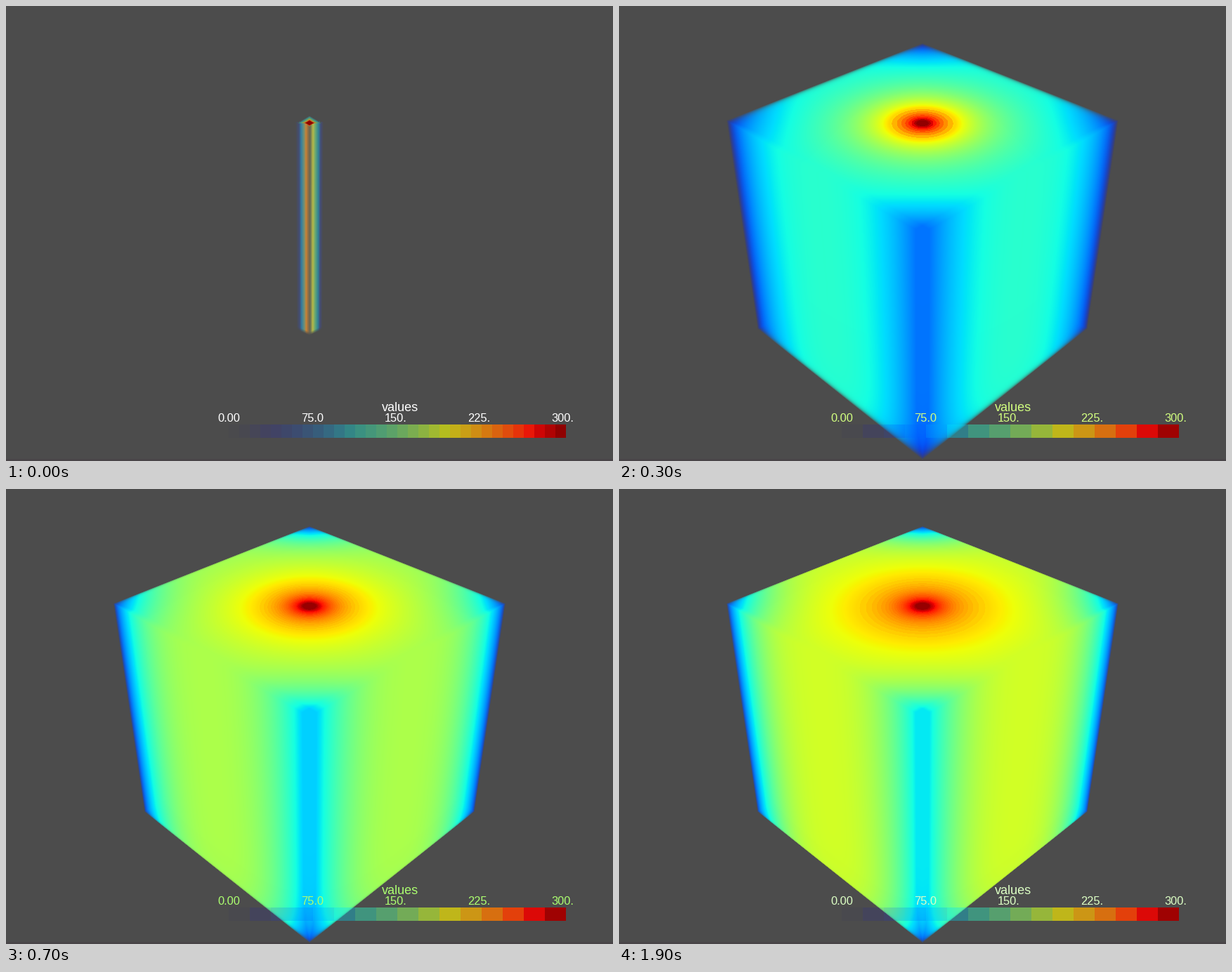
These frames come from a looping animation (864x648 px, 2 s). A matplotlib script:

```python
import numpy as np
import matplotlib.pyplot as plt
from matplotlib.animation import FuncAnimation

W, H, DPI = 864, 648, 100
FRAMES, INTERVAL = 20, 100
BG = np.array([76, 76, 76]) / 255
JET = plt.get_cmap("jet", 1024)

# Isometric camera looking at a unit cube with a 30 degree view angle
FOCAL = H / 2 / np.tan(np.radians(15))
DIST = np.sqrt(0.75) / np.sin(np.radians(15))
HALF = 0.499
VIEW = np.array([1, 1, 1]) / np.sqrt(3)
RIGHT = np.array([-1, 1, 0]) / np.sqrt(2)
UP = np.array([-1, -1, 2]) / np.sqrt(6)


def cast_rays():
    """Return the mask of pixels on the cube, entry points and path lengths."""
    rows, cols = np.mgrid[0:H, 0:W]
    sx = (cols + 0.5 - W / 2) / FOCAL
    sy = (H / 2 - rows - 0.5) / FOCAL
    rays = sx[..., None] * RIGHT + sy[..., None] * UP - VIEW
    rays = np.where(np.abs(rays) < 1e-9, 1e-9, rays)
    eye = DIST * VIEW
    t1, t2 = (-HALF - eye) / rays, (HALF - eye) / rays
    near = np.minimum(t1, t2).max(axis=-1)
    far = np.maximum(t1, t2).min(axis=-1)
    hit = far > near
    entry = eye + near[hit][:, None] * rays[hit]
    length = (far - near)[hit] * np.linalg.norm(rays[hit], axis=-1)
    return hit, entry, length


HIT, ENTRY, LENGTH = cast_rays()
# Long rays show the volume a little below its surface, short ones the surface
DEPTH = 1 - np.exp(-LENGTH / 0.1)
PX, PY = (np.clip(ENTRY[:, i] - 0.015 * DEPTH, -0.5, 0.5 - 0.045 * DEPTH)
          for i in (0, 1))
RADIUS = np.maximum(np.hypot(PX, PY), 0.012)
CORNER = (16 * PX**2 * PY**2) ** 1.5

HOT = 0.514 - 0.115 * np.log(RADIUS) + 0.04 * np.exp(-(RADIUS / 0.08) ** 2)
STEADY = HOT - 0.37 * CORNER
LAG = (1 - np.exp(-(RADIUS / 0.19) ** 1.5)) * (1 - 0.8 * CORNER)


def draw_cube(img, n):
    cold = 0.685 ** (n - 2)
    value = np.clip(STEADY - 0.307 * cold * LAG, 0.08, 0.985)
    step = 0.04 if n < 6 else 0.0125
    banded = 0.66 + (np.floor((value - 0.66) / step) + 0.5) * step
    shade = np.where(value > 0.68, np.minimum(banded, 0.985), value)
    density = 40 + 260 * max(1 - cold, 0)
    alpha = 1 - (1 - value) ** (density * LENGTH)
    rgb = JET(shade)[:, :3]
    img[HIT] = BG + (rgb - BG) * alpha[:, None]


# Colour across the thin rod, by horizontal offset from its axis
ROD_X = [-20, -15, -12, -8, -5, -1, 1, 5, 9, 13, 16, 20]
ROD_RGB = np.array([
    (76, 76, 76), (68, 78, 118), (52, 125, 160), (110, 145, 120),
    (202, 130, 52), (125, 105, 75), (100, 104, 88), (182, 186, 72),
    (95, 165, 120), (50, 130, 150), (68, 76, 120), (76, 76, 76),
]) / 255
CAP_D = [0, 0.36, 0.46, 0.65, 0.9, 1.15]
CAP_RGB = np.array([
    (130, 0, 0), (150, 8, 0), (205, 110, 35),
    (130, 165, 80), (60, 140, 140), (76, 76, 76),
]) / 255


def ramp(x, xs, colors):
    return np.stack([np.interp(x, xs, c) for c in colors.T], axis=-1)


def draw_rod(img):
    rows, cols = np.mgrid[0:H, 0:W] + 0.5
    dx = cols - W / 2
    wide = dx / np.interp(rows, [165, 466], [1, 0.92])
    top = 163 + 0.1 * np.abs(dx)
    bottom = 469 - 0.45 * np.abs(dx)
    body = (rows > top) & (rows < bottom) & (np.abs(wide) < 20)
    fade = np.clip((bottom - rows) / 5, 0, 1)[body][:, None]
    img[body] = BG + (ramp(wide[body], ROD_X, ROD_RGB) - BG) * fade
    d = np.abs(dx) / 15 + np.abs(rows - 166.5) / 9
    cap = (d < 1.15) & ((rows < 167) | (d < 0.5))
    img[cap] = ramp(d[cap], CAP_D, CAP_RGB)


BAR_X0, BAR_X1, BAR_Y0, BAR_Y1 = 317, 797, 596, 615


def draw_bar(img, bands):
    v = (np.arange(BAR_X0, BAR_X1) + 0.5 - BAR_X0) / (BAR_X1 - BAR_X0)
    v = (np.floor(v * bands) + 0.5) / bands
    area = img[BAR_Y0:BAR_Y1, BAR_X0:BAR_X1]
    area += (JET(v)[:, :3] - area) * v[:, None]


def render(n):
    img = np.tile(BG, (H, W, 1))
    img[645:] = np.array([73, 69, 72]) / 255
    if n == 0:
        draw_rod(img)
    else:
        draw_cube(img, n)
    draw_bar(img, 32 if n == 0 else 16)
    return img


TEXT_TIMES = np.array([0, 1, 3, 5, 7, 14, 19])
TEXT_COLORS = ["#ffffff", "#c8ff70", "#d2ff80", "#98ff7a",
               "#acff70", "#8cff84", "#dcffc4"]

fig = plt.figure(figsize=(W / DPI, H / DPI), dpi=DPI, facecolor=BG)
ax = fig.add_axes([0, 0, 1, 1])
ax.axis("off")
picture = ax.imshow(render(0), extent=(0, W, H, 0), interpolation="nearest",
                    aspect="auto")
ax.set_xlim(0, W)
ax.set_ylim(H, 0)


def label(x, y, text, px):
    return ax.text(x, y, text, fontsize=px * 72 / DPI, color="white",
                   family="Liberation Sans", ha="center", va="baseline")


labels = [label(561, 577, "values", 18)]
for i, text in enumerate(["0.00", "75.0", "150.", "225.", "300."]):
    labels.append(label(317 + 118.7 * i, 591.5, text, 16.4))


def update(n):
    picture.set_data(render(n))
    color = TEXT_COLORS[np.searchsorted(TEXT_TIMES, n, side="right") - 1]
    for item in labels:
        item.set_color(color)
    return [picture, *labels]


anim = FuncAnimation(fig, update, frames=FRAMES, interval=INTERVAL,
                     init_func=lambda: update(0), repeat=True, repeat_delay=0)
plt.show()
```
